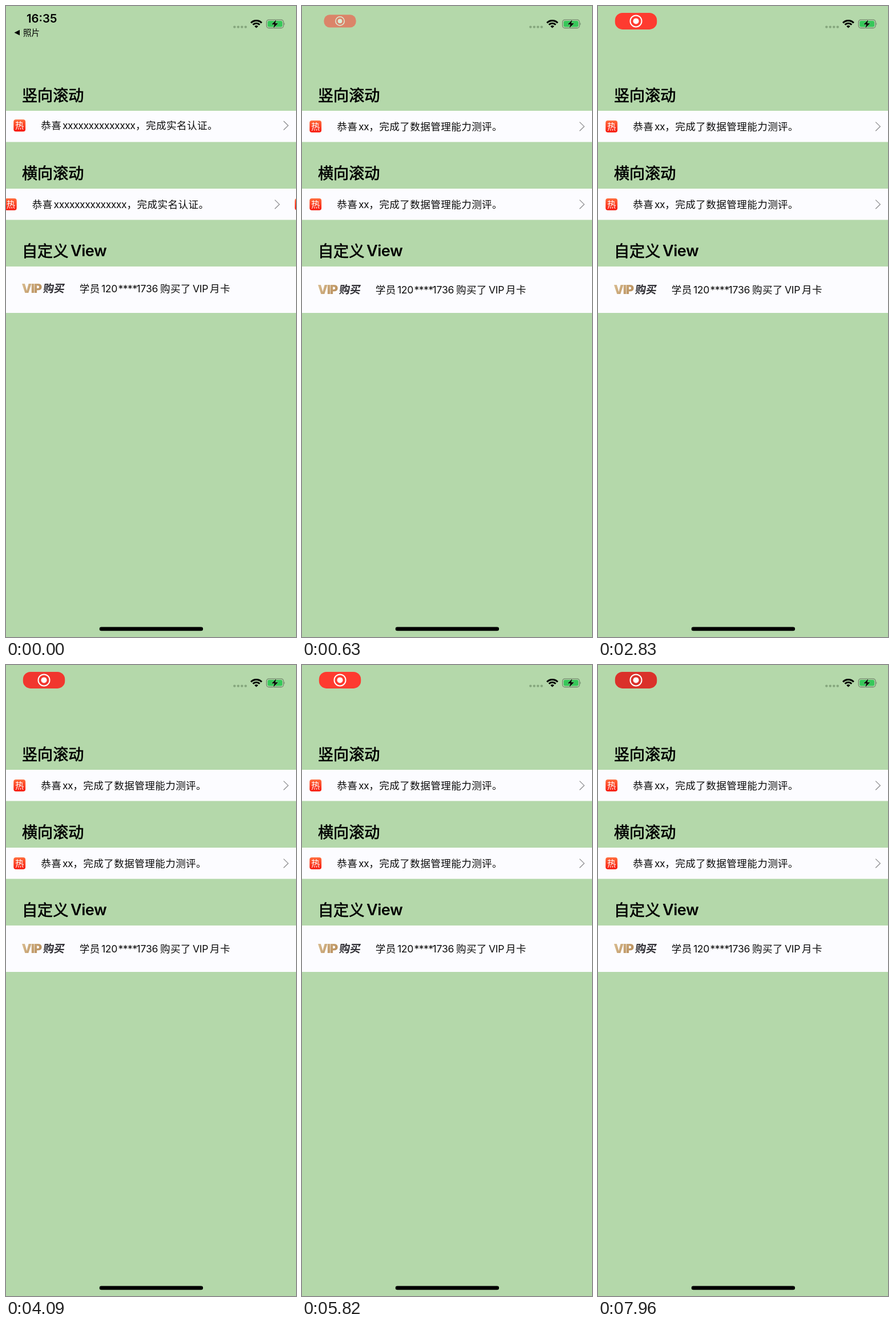
Animation of 508 by 1102 pixels, one loop 8000 ms. Source, as an HTML page:

```html
<!DOCTYPE html>
<html lang="zh-CN">
<head>
<meta charset="utf-8">
<title>滚动</title>
<style>
html, body { margin: 0; width: 100%; height: 100%; overflow: hidden; background: #b4d8aa; }
svg { display: block; }
text { font-family: Inter, "Noto Sans CJK SC", "Noto Sans CJK", sans-serif; white-space: pre; text-autospace: no-autospace; }
.zh { font-family: "Noto Sans CJK SC", "Noto Sans CJK", sans-serif; }
.row { font-size: 17.6px; letter-spacing: .4px; fill: #0c0c0c; }
.title { font-size: 27.1px; stroke: #000; stroke-width: .7; stroke-linejoin: round; }
.title .en { font-weight: 600; letter-spacing: -.5px; stroke: none; }
</style>
</head>
<body>
<svg id="stage" width="508" height="1102" viewBox="0 0 508 1102">
  <defs>
    <linearGradient id="hot" x2="0" y2="1">
      <stop stop-color="#ff6c3c"/><stop offset="1" stop-color="#f7170d"/>
    </linearGradient>
    <linearGradient id="gold" x2="1" y2=".6">
      <stop stop-color="#dcc196"/><stop offset="1" stop-color="#b98f5c"/>
    </linearGradient>
  </defs>
  <rect width="508" height="1102" fill="#b4d8aa"/>

  <g id="clock">
    <text x="36" y="28.6" font-size="20.3" font-weight="600">16:35</text>
    <path d="M14.5 46.5L24 41.8V51.2Z"/>
    <text class="zh" x="30" y="52" font-size="14.6">照片</text>
  </g>
  <g id="pill">
    <rect id="pillBody" x="-36.7" y="-14.5" width="73.4" height="29" rx="13"/>
    <circle r="10" fill="none" stroke="#fff" stroke-width="2"/>
    <circle r="5" fill="#fff"/>
  </g>

  <g fill="#85a67d">
    <circle cx="400.3" cy="36.6" r="2.2"/><circle cx="406.8" cy="36.6" r="2.2"/>
    <circle cx="413.3" cy="36.6" r="2.2"/><circle cx="419.8" cy="36.6" r="2.2"/>
  </g>
  <g transform="translate(438.5 38.5)">
    <path d="M-9.4 -9A13 13 0 0 1 9.4 -9M-5.9 -5.7A8.2 8.2 0 0 1 5.9 -5.7" fill="none" stroke="#000" stroke-width="3"/>
    <path d="M0 0L-3.2 -3.1A4.4 4.4 0 0 1 3.2 -3.1Z"/>
  </g>
  <rect x="456.4" y="24.1" width="29.6" height="14.4" rx="4" fill="none" stroke="#71876c" stroke-width="1.3"/>
  <rect x="458.3" y="26" width="25.8" height="10.6" rx="2.4" fill="#36c759"/>
  <path d="M487.3 28.8Q489.4 31.3 487.3 33.8Z" fill="#71876c"/>
  <path d="M473.3 24.2L465.3 32.2H470.2L468.3 38.6L476.6 30.2H471.6Z" stroke="#b4d8aa" stroke-width=".8" paint-order="stroke"/>

  <text class="title zh" x="28" y="166">竖向滚动</text>
  <text class="title zh" x="28" y="302">横向滚动</text>
  <text class="title zh" x="28" y="438">自定义<tspan class="en" x="113" y="437" font-family="Inter, sans-serif">View</tspan></text>

  <svg y="183" width="508" height="54.4"><rect width="508" height="55" fill="#fcfcff"/><g id="vert"></g></svg>
  <svg y="319" width="508" height="54.4"><rect width="508" height="55" fill="#fcfcff"/><g id="horiz"></g></svg>
  <svg y="454.8" width="508" height="81.3"><rect width="508" height="82" fill="#fcfcff"/><g id="custom"></g></svg>

  <rect x="163.7" y="1084.6" width="181.4" height="6.6" rx="3.3"/>
</svg>
<script>
const LOOP = 8000, WIDTH = 508, ROW = 54.2, CARD = 81.3;
const $ = id => document.getElementById(id);

const at = (x, y, body) => `<g transform="translate(${x} ${y})">${body}</g>`;

// One notice: badge, message, chevron
const notice = (name, rest, restX) => `
  <rect x="13.3" y="17" width="20.8" height="20.8" rx="4" fill="url(#hot)"/>
  <text class="zh" x="23.7" y="33" font-size="15.2" fill="#fff" text-anchor="middle">热</text>
  <text class="row zh" x="61.2" y="34">恭喜<tspan x="99" font-family="Inter, sans-serif" letter-spacing="-.5" style="letter-spacing:-.5px">${name}</tspan><tspan x="${restX}">${rest}</tspan></text>
  <path d="M486.3 19.6L494.3 27.4L486.3 35.2" fill="none" stroke="#8d8d90" stroke-width="1.3"/>`;

const en = (x, s, gap) =>
  `<tspan x="${x}" font-family="Inter, sans-serif" style="letter-spacing:${gap}px">${s}</tspan>`;

const card = `
  <text x="27.5" y="48.6" font-size="22" font-weight="900" letter-spacing="-1.3" fill="url(#gold)">VIP</text>
  <text class="zh" transform="translate(64.5 47.6) skewX(-8)" font-size="18.8" font-weight="900" fill="#2b2a30">购买</text>
  <text class="row zh" x="128.8" y="47.4">学员${en(167, "120", -.3)}${en(196.5, "****", -.6)}${en(228.5, "1736", -.2)}<tspan x="270">购买了</tspan>${en(327, "VIP", -.3)}<tspan x="357">月卡</tspan></text>`;

const first = notice("x".repeat(14), "，完成实名认证。", 227);
const second = notice("xx", "，完成了数据管理能力测评。", 117.2);

$("vert").innerHTML = at(0, 0, first) + at(0, ROW, second);
$("horiz").innerHTML = at(0, 0, first) + at(WIDTH, 0, second);
$("custom").innerHTML = at(0, 0, card) + at(0, CARD, card);

const ramp = (t, from, to) => Math.min(1, Math.max(0, (t - from) / (to - from)));
const smooth = x => x * x * (3 - 2 * x);
const mix = (a, b, k) => Math.round(a + (b - a) * k);
const move = (id, x, y) => $(id).setAttribute("transform", `translate(${x} ${y})`);

function draw(t) {
  const p = smooth(ramp(t, -63, 551));
  move("vert", 0, -ROW * p);
  move("horiz", -WIDTH * p, 0);
  move("custom", 0, -CARD * p);

  $("clock").setAttribute("opacity", 1 - ramp(t, 20, 200));

  const grow = ramp(t, 180, 1030);
  $("pill").setAttribute("opacity", grow);
  $("pill").setAttribute("transform", `translate(66.5 26.4) scale(${0.5 + grow / 2})`);

  // The recording pill pulses darker and back
  const k = grow < 1 ? 0 : (1 - Math.cos((t - 5887) / 1500 * 2 * Math.PI)) / 2;
  $("pillBody").setAttribute("fill", `rgb(${mix(255, 213, k)},${mix(59, 48, k)},${mix(48, 41, k)})`);
}

const start = performance.now();
function tick() {
  draw((performance.now() - start) % LOOP);
  requestAnimationFrame(tick);
}
draw(0);
requestAnimationFrame(tick);
</script>
</body>
</html>
```
